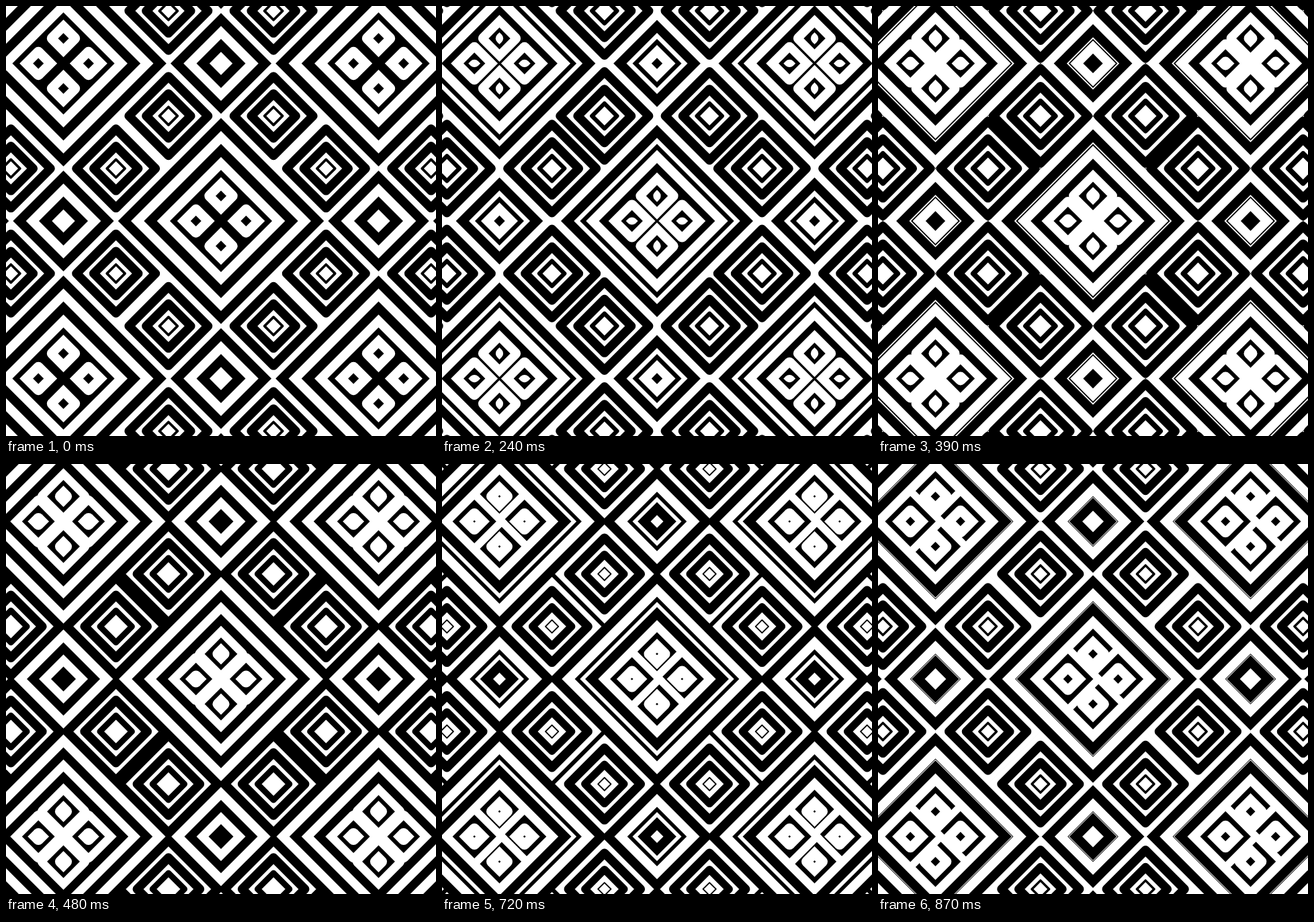
An HTML page with a canvas for the animation above (900 ms loop, 640 by 640 pixels).

```html
<!DOCTYPE html>
<html>
<head>
<meta charset="utf-8">
<title>Expanding diamonds</title>
<style>
html, body { margin: 0; width: 100%; height: 100%; overflow: hidden; background: #fff; }
canvas { display: block; }
</style>
</head>
<body>
<canvas id="stage" width="640" height="640"></canvas>
<script>
const ctx = document.getElementById('stage').getContext('2d');
const LOOP = 900, STEP = 30;
const UNIT = 78.17;   // half diagonal of one lattice cell
const GAP = 19.3;     // distance between band edges
const PETAL = 37.3;   // petal distance from the middle of a large diamond
const BLACK = '#000', WHITE = '#fff';

function diamondPath(x, y, r) {
  ctx.beginPath();
  ctx.moveTo(x, y - r);
  ctx.lineTo(x + r, y);
  ctx.lineTo(x, y + r);
  ctx.lineTo(x - r, y);
  ctx.closePath();
}

function diamond(x, y, r, color) {
  if (r <= 0) return;
  diamondPath(x, y, r);
  ctx.fillStyle = color;
  ctx.fill();
}

// Square on its tip with the two side corners rounded
function leaf(r) {
  if (r < 2.5) return;
  const round = Math.min(8, r * 1.414);
  ctx.beginPath();
  ctx.moveTo(0, -r);
  ctx.arcTo(r, 0, 0, r, round);
  ctx.lineTo(0, r);
  ctx.arcTo(-r, 0, 0, -r, round);
  ctx.closePath();
  ctx.fillStyle = WHITE;
  ctx.fill();
}

// Outer edges shrink and inner edges grow towards a fixed one
function bands(x, y, fixed, phase, ink, paper) {
  const shift = GAP * phase;
  const edges = [
    fixed + 42, fixed + 3 * GAP - shift, fixed + 2 * GAP - shift, fixed + GAP - shift,
    fixed, fixed - GAP + shift, fixed - 2 * GAP + shift
  ];
  for (let i = edges[1] < edges[0] ? 0 : 2; i < edges.length; i++) {
    diamond(x, y, edges[i], i % 2 ? paper : ink);
  }
}

function petals(x, y, t) {
  for (let side = 0; side < 4; side++) {
    ctx.save();
    ctx.translate(x, y);
    ctx.rotate(side * Math.PI / 2);
    ctx.translate(0, -PETAL);
    leaf(28 + 26 * t);
    diamond(0, 0, 8 + 30.7 * t, BLACK);
    leaf(2 + 26 * t);
    diamond(0, 0, 30.7 * t - 22.7, BLACK);
    ctx.restore();
  }
}

function ring(x, y, age) {
  const width = Math.min(13.3, 9.4 * (age + 0.4));
  if (width <= 0.05) return;
  const tip = 15.3 + 23.8 * age + 0.65 * age * age;
  diamondPath(x, y, tip - width / 2);
  ctx.lineWidth = width;
  ctx.stroke();
}

function roundedCell(x, y, t, phase) {
  const late = t >= 0.5;
  if (late) diamond(x, y, Math.min(62.2 + GAP * phase, UNIT + 0.5), WHITE);
  for (let n = late ? 1 : 2; n >= -1; n--) ring(x, y, t + n);
}

function eachCell(visit) {
  for (let i = -6; i <= 6; i++) {
    for (let j = -6; j <= 6; j++) {
      visit(320 + i * UNIT, 320 + j * UNIT, i, j, (i + j) % 2 !== 0);
    }
  }
}

function draw(t) {
  const phase = t * 2 % 1;
  const [ink, paper] = t < 0.5 ? [BLACK, WHITE] : [WHITE, BLACK];
  ctx.fillStyle = paper;
  ctx.fillRect(0, 0, 640, 640);
  ctx.strokeStyle = BLACK;
  ctx.lineJoin = 'round';

  eachCell((x, y, i, j, odd) => {
    if (i % 3 || j % 3) return;
    bands(x, y, odd ? 36.5 : 36.5 + UNIT, phase, ink, paper);
    if (!odd) petals(x, y, t);
  });
  eachCell((x, y, i, j, odd) => {
    if (odd && i % 3 && j % 3) roundedCell(x, y, t, phase);
  });
}

function tick() {
  const ms = performance.now() % LOOP;
  draw(Math.floor(ms / STEP) * STEP / LOOP);
  requestAnimationFrame(tick);
}
tick();
</script>
</body>
</html>
```
